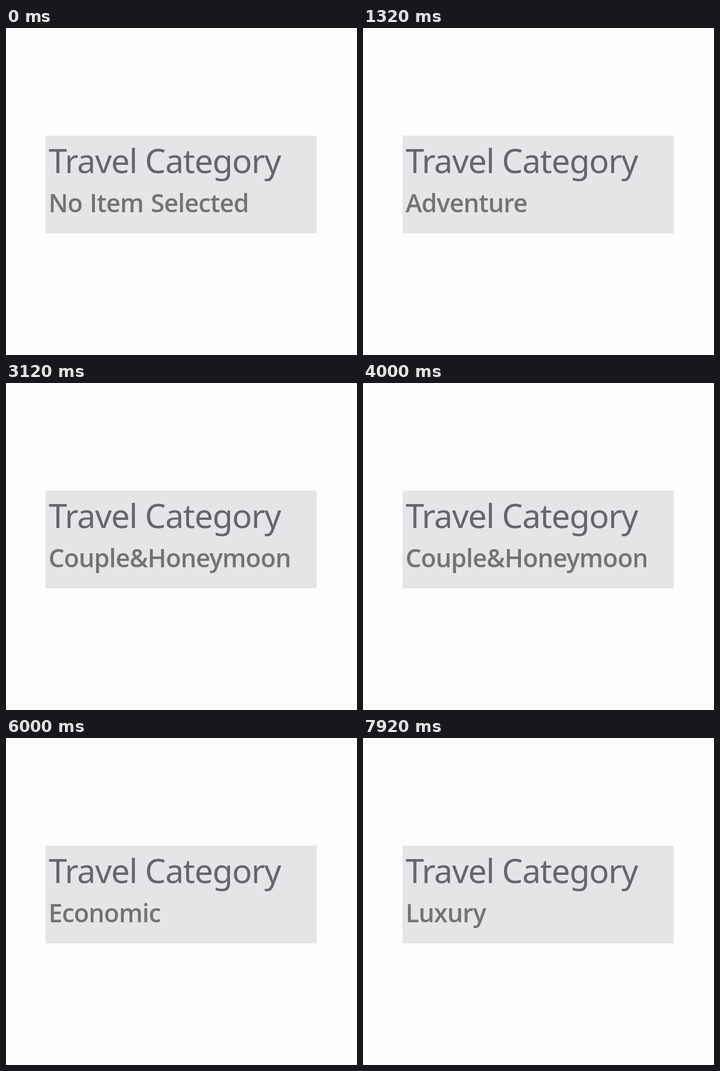
Recreate the animation shown at these times as an HTML page. Size 600 by 559 pixels, loop 9.96 s.

```html
<!DOCTYPE html>
<html lang="en">
<head>
<meta charset="utf-8">
<title>Travel Category</title>
<style>
  html, body { margin: 0; height: 100%; overflow: hidden; background: #fefdfe; }
  svg { display: block; }
  .title { font: 400 56.5px "Noto Sans", "Open Sans", sans-serif; letter-spacing: -1.1px; fill: #676569; }
  .item { font: 600 42.7px "Open Sans", "Noto Sans", sans-serif; letter-spacing: -.8px; word-spacing: 2.2px; fill: #737274; }
</style>
</head>
<body>
<svg width="600" height="559" viewBox="0 0 600 559">
  <rect x="67.5" y="184" width="463.5" height="167" fill="#e5e4e6"/>
  <text class="title" x="73" y="248">Travel Category</text>
  <text class="item" id="item" x="72.7" y="314.5">No Item Selected</text>
</svg>
<script>
  const LOOP = 9960;
  const steps = [
    [0, "No Item Selected"],
    [1320, "Adventure"],
    [3120, "Couple&Honeymoon"],
    [4800, "Economic"],
    [6400, "Family Vacation"],
    [7920, "Luxury"]
  ];
  const item = document.getElementById("item");
  const start = performance.now();

  function draw() {
    const t = (performance.now() - start) % LOOP;
    const label = steps.filter(([from]) => from <= t).pop()[1];
    if (item.textContent !== label) item.textContent = label;
    requestAnimationFrame(draw);
  }
  draw();
</script>
</body>
</html>
```
